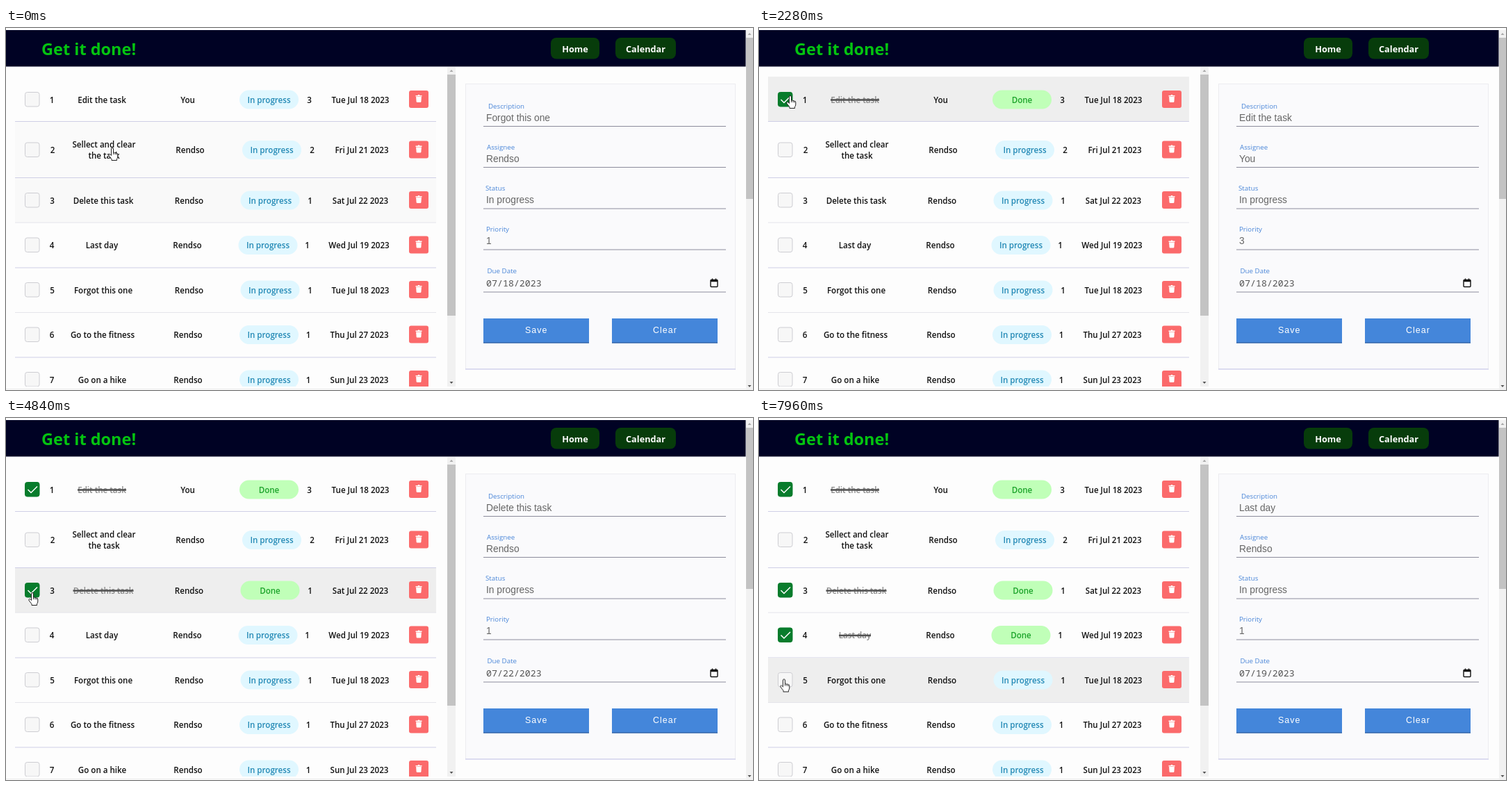
Recreate the animation shown at these times as an HTML page. Size 1075 by 521 pixels, loop 8000 ms.

```html
<!DOCTYPE html>
<html lang="en">
<head>
<meta charset="utf-8">
<title>Task list</title>
<style>
  html, body { margin: 0; width: 100%; height: 100%; overflow: hidden; background: #fdfdfd; }
  svg { display: block; width: 1075px; height: 521px; }
  text { font-family: "Open Sans", "Noto Sans", sans-serif; font-size: 11.6px; font-weight: 600; fill: #111; }
  .mid { text-anchor: middle; }
  .title { font-size: 23.5px; font-weight: 700; fill: #04c410; }
  .nav { font-size: 12.7px; font-weight: 700; fill: #fff; }
  .struck { fill: #888; }
  .open { fill: #2389b5; }
  .closed { fill: #1ba32a; }
  .label { font-size: 9.75px; font-weight: 400; fill: #4a86d8; }
  .value { font: 13.8px "Liberation Sans", Arial, sans-serif; fill: #666; }
  .date { font: 13.3px "Noto Sans Mono", "DejaVu Sans Mono", monospace; fill: #555; }
  .button { font: 12.5px "Liberation Sans", Arial, sans-serif; letter-spacing: 1px; fill: #fff; }
</style>
</head>
<body>
<svg viewBox="0 0 1075 521" xmlns="http://www.w3.org/2000/svg">
  <defs>
    <clipPath id="listArea"><rect y="56" width="635" height="460"/></clipPath>
    <g id="bin" fill="#fff">
      <path d="M-4.5-5h3l.7-1h1.6l.7 1h3v1.4h-9z"/>
      <path d="M-3.9-3h7.8l-.5 7q-.1 1-1.1 1h-4.6q-1 0-1.1-1z"/>
    </g>
  </defs>

  <rect width="1075" height="521" fill="#fdfdfd"/>
  <rect y="3" width="1064.5" height="52.5" fill="#000224"/>
  <text class="title" x="51" y="39">Get it done!</text>
  <g fill="#073c0b">
    <rect x="784" y="14" width="70" height="30.500" rx="8"/>
    <rect x="877" y="14" width="87" height="30.500" rx="8"/>
  </g>
  <text class="nav mid" x="819" y="34.5">Home</text>
  <text class="nav mid" x="920.5" y="34.5">Calendar</text>

  <g id="list" clip-path="url(#listArea)"></g>
  <path d="M0 519.5h1065" stroke="#ececec"/>

  <g fill="#f1f1f1">
    <rect x="635" y="56" width="12" height="460"/>
    <rect x="1065" y="3" width="10" height="518"/>
  </g>
  <g fill="#c3c3c3">
    <rect x="635" y="67" width="12" height="347"/>
    <rect x="1065" y="14" width="10" height="232"/>
  </g>
  <path d="M638.5 63l2.5-3 2.5 3zM1067.5 10l2.5-3 2.5 3z" fill="#a8a8a8"/>
  <path d="M638.5 509l2.5 3 2.5-3zM1067.5 514l2.5 3 2.5-3z" fill="#555"/>

  <rect x="661.5" y="80.5" width="388" height="410" fill="#fafafc" stroke="#ececf0"/>
  <path d="M661 491h389" stroke="#d3d3ee" stroke-width="1.5"/>
  <g id="form"></g>
  <g fill="none" stroke="#111">
    <rect x="1014" y="362.5" width="10" height="10" rx="1" stroke-width="1.4"/>
    <path d="M1014 364h10" stroke-width="2.5"/>
    <path d="M1016.5 360.5v2M1021.5 360.5v2" stroke-width="1.4"/>
  </g>
  <g fill="#4486da">
    <rect x="687" y="418" width="152" height="35"/>
    <rect x="872" y="418" width="152" height="35"/>
  </g>
  <path d="M687 453h152M872 453h152" stroke="#3265ab" stroke-width="1.3"/>
  <text class="button" x="747" y="439">Save</text>
  <text class="button" x="931" y="439">Clear</text>

  <g id="cursor">
    <path d="M-1.5 1Q-1.5-.5 0-.5T1.5 1v5.300q1.300-.8 2.300.4 1.200-.7 2.100.6 1.900-.4 1.900 1.500v3.200q0 2-1.300 3.500v2h-7.500v-1.800L-4.700 11q-1-1.500 0-2.300 1-.6 2 .5l1.200 1.300z"
          fill="#fff" stroke="#222" stroke-linejoin="round"/>
    <path d="M1.5 6v3M3.900 6.800v2.400M6 7.500v2" stroke="#222" stroke-width=".9"/>
  </g>
</svg>

<script>
const LOOP = 8000;
const CLICKS = [1600, 4240, 6800];
const OWNER = "Rendso";
const sheet = document.head.appendChild(document.createElement("style"));
let rules = 0;

// Turns [ms, value] pairs into a looping keyframe animation.
function animate(prop, keys, easing) {
  const name = "k" + rules++;
  const body = keys.map(([ms, value]) => `${ms / LOOP * 100}%{${prop}:${value}}`).join("");
  sheet.textContent += `@keyframes ${name}{${body}}\n`;
  return `animation:${name} ${LOOP}ms ${easing} infinite`;
}

const visible = (from, to) => animate("opacity", [
  [0, from ? 0 : 1], ...(from ? [[from, 1]] : []), [to, to < LOOP ? 0 : 1], ...(to < LOOP ? [[LOOP, 0]] : [])
], "step-end");

const hover = keys => animate("opacity", keys, "linear");
const text = (cls, x, y, content) => `<text class="${cls}" x="${x}" y="${y}">${content}</text>`;
const group = (style, content) => `<g style="${style}">${content}</g>`;

// x: centres of the number, task, assignee, status, priority and date columns
const rows = [
  { top: 70, bottom: 134.5, y: 103, lines: ["Edit the task"], who: "You", x: [66, 138, 261.5, 378.5, 436.5, 510],
    level: 3, due: "Tue Jul 18 2023", done: CLICKS[0], half: 35,
    hover: [[0, 0], [450, 0], [720, 1], [2600, 1], [2900, 0], [LOOP, 0]] },
  { top: 135, bottom: 215.5, y: 175.5, lines: ["Sellect and clear", "the task"], who: OWNER, x: [67, 141, 265, 382.5, 440.5, 512],
    level: 2, due: "Fri Jul 21 2023",
    hover: [[0, .15], [100, .4], [400, .7], [700, 0], [2600, 0], [2850, .8], [3050, .8], [3350, 0], [LOOP, 0]] },
  { top: 216, bottom: 280, y: 248, lines: ["Delete this task"], who: OWNER, x: [66.5, 140, 263.5, 380, 437.5, 510],
    level: 1, due: "Sat Jul 22 2023", done: CLICKS[1], half: 43.5,
    hover: [[0, .3], [160, 0], [3050, 0], [3350, 1], [5620, 1], [5900, 0], [LOOP, 0]] },
  { top: 280, bottom: 345, y: 312.5, lines: ["Last day"], who: OWNER, x: [66, 138, 261, 377, 433.5, 508],
    level: 1, due: "Wed Jul 19 2023", done: CLICKS[2], half: 23,
    hover: [[0, 0], [5620, 0], [5900, 1], [7450, 1], [7740, 0], [LOOP, 0]] },
  { top: 345, bottom: 409.5, y: 377, lines: ["Forgot this one"], who: OWNER, x: [66.5, 140, 263.5, 380, 437.5, 510],
    level: 1, due: "Tue Jul 18 2023", hover: [[0, 0], [7450, 0], [7740, 1], [LOOP, 1]] },
  { top: 410, bottom: 474, y: 441.5, lines: ["Go to the fitness"], who: OWNER, x: [66, 139, 262, 378.5, 435, 508.5],
    level: 1, due: "Thu Jul 27 2023" },
  { top: 474, bottom: 539, y: 506, lines: ["Go on a hike"], who: OWNER, x: [66, 138.5, 262, 378.5, 435, 508.5],
    level: 1, due: "Sun Jul 23 2023" }
];

function taskState(row, done) {
  const { y, x, lines } = row;
  const first = y + 4.5 - (lines.length - 1) * 7.75;
  const task = lines.map((line, i) =>
    text(done ? "mid struck" : "mid", x[1], first + i * 15.5, line)).join("");
  const strike = done ? `<path d="M${x[1] - row.half} ${y + .5}h${row.half * 2}" stroke="#505050" stroke-width="2.4"/>` : "";
  const box = `<rect x="27.5" y="${y - 10.5}" width="20.5" height="20.5" rx="3"
    fill="${done ? "#087c2c" : "#f7f7f7"}" stroke="${done ? "#087c2c" : "#cdcdd2"}"/>`;
  const tick = done ? `<path d="M31.5 ${y}l4.5 4.5 9-9" fill="none" stroke="#fff" stroke-width="1.5"/>` : "";
  const pill = `<rect x="${x[3] - 42.5}" y="${y - 13.5}" width="85" height="27" rx="13.5" fill="${done ? "#c0ffb8" : "#e0f7ff"}"/>`;
  return task + strike + box + tick + pill +
    text(done ? "mid closed" : "mid open", x[3], y + 4.5, done ? "Done" : "In progress");
}

function drawRow(row, i) {
  const { y, x, top, bottom } = row;
  const shade = row.hover
    ? `<rect x="13" y="${top}" width="606" height="${bottom - top}" fill="#eee" style="${hover(row.hover)}"/>` : "";
  const state = row.done
    ? group(visible(0, row.done), taskState(row, false)) + group(visible(row.done, LOOP), taskState(row, true))
    : taskState(row, false);
  return shade +
    `<path d="M13 ${bottom}h606" stroke="${i === 2 || i === 4 ? "#e4e4ea" : "#cfcfe6"}"/>` + state +
    text("mid", x[0], y + 4.5, i + 1) + text("mid", x[2], y + 4.5, row.who) +
    text("mid", x[4], y + 4.5, row.level) + text("mid", x[5], y + 4.5, row.due) +
    `<rect x="580" y="${y - 13}" width="28" height="25" rx="3" fill="#fb6a6b"/>
     <use href="#bin" x="594" y="${y - 1}"/>`;
}

const fields = [
  ["Description", 694, 116, 141.5], ["Assignee", 692, 175, 200.5], ["Status", 690, 234, 260],
  ["Priority", 691, 293, 319], ["Due Date", 692.5, 352.5, 380]
];
const entries = [
  ["Forgot this one", OWNER, "In progress", 1, "07/18/2023"],
  ["Edit the task", "You", "In progress", 3, "07/18/2023"],
  ["Delete this task", OWNER, "In progress", 1, "07/22/2023"],
  ["Last day", OWNER, "In progress", 1, "07/19/2023"]
];
const edges = [0, ...CLICKS, LOOP];

document.getElementById("list").innerHTML = rows.map(drawRow).join("");
document.getElementById("form").innerHTML =
  fields.map(([label, x, y, line]) =>
    text("label", x, y, label) + `<path d="M687 ${line}h349" stroke="#8c8c9c"/>`).join("") +
  entries.map((entry, i) => group(visible(edges[i], edges[i + 1]), entry.map((value, j) =>
    text(j === 4 ? "date" : "value", 691, fields[j][2] + (j === 4 ? 19 : 18), value)).join(""))).join("");

const at = (x, y) => `translate(${x}px,${y}px)`;
document.getElementById("cursor").style.cssText = animate("transform", [
  [0, at(153, 173)], [80, at(153, 173)], [880, at(48, 95)], [1300, at(48, 95)],
  [1560, at(45, 98)], [2400, at(45, 98)], [3600, at(38, 252)], [5480, at(38, 252)],
  [5920, at(36, 318.5)], [7240, at(36, 318.5)], [7840, at(36, 376.5)], [LOOP, at(36, 376.5)]
], "ease-in-out");
</script>
</body>
</html>
```
